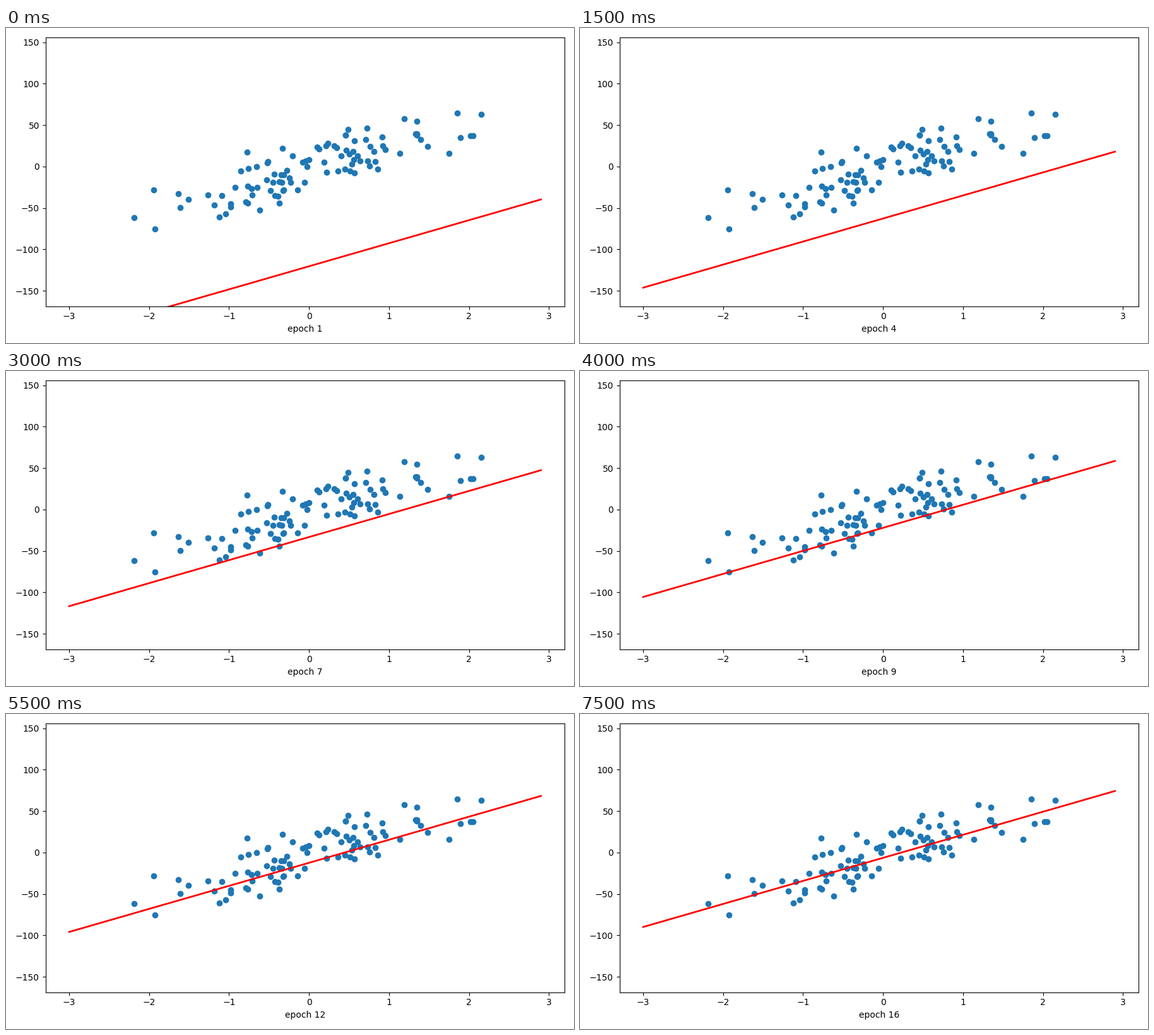
Write a matplotlib script that moves like this. It is 900 px wide and 500 px high and loops after 8000 ms.

```python
import numpy as np
import matplotlib.pyplot as plt
from matplotlib.animation import FuncAnimation

EPOCHS = 16
SLOPE = 27.82
RATE = 0.001

# Noisy linear samples
rng = np.random.RandomState(13)
x = rng.standard_normal(100)
coef = 100 * rng.uniform()
y = coef * x + rng.normal(scale=20, size=100)

# Gradient descent on the intercept alone
intercepts = []
b = -150.0
for _ in range(EPOCHS):
    grad = -2 * np.sum(y - SLOPE * x - b)
    b -= RATE * grad
    intercepts.append(b)

plt.rcParams["font.family"] = "DejaVu Sans"
fig, ax = plt.subplots(figsize=(9, 5), dpi=100)
xs = np.arange(-3, 3, 0.1)[:60]
ax.scatter(x, y)
line, = ax.plot(xs, 50 * xs - 4, "r-", linewidth=2)
ax.set_xlabel("epoch 1")
fig.tight_layout()
ax.set_xlim(ax.get_xlim())
ax.set_ylim(ax.get_ylim())


def update(i):
    line.set_ydata(SLOPE * xs + intercepts[i])
    ax.set_xlabel(f"epoch {i + 1}")
    return line, ax.xaxis.label


anim = FuncAnimation(fig, update, frames=EPOCHS, interval=500,
                     repeat=True, repeat_delay=0)
plt.show()
```
